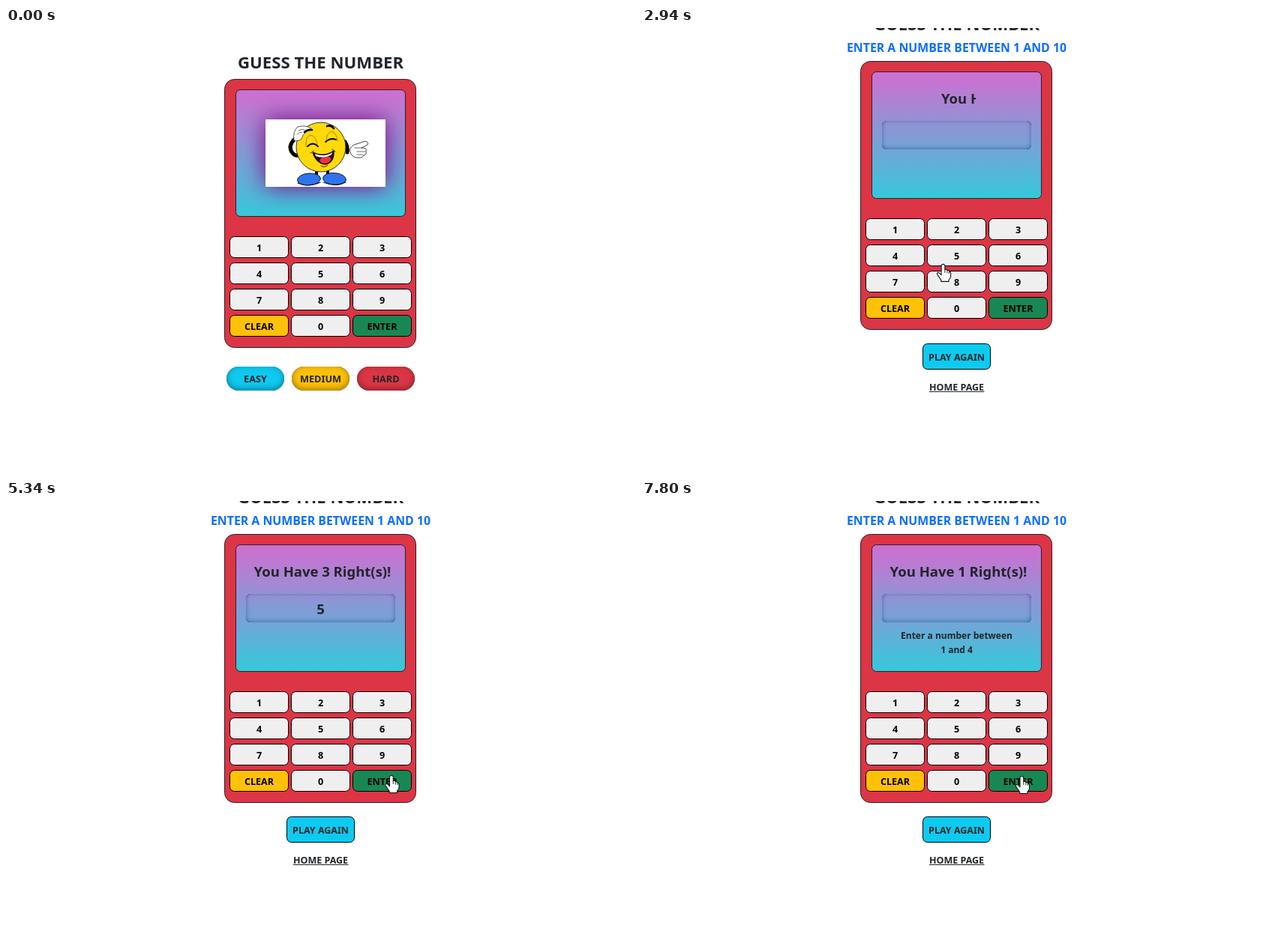
Write an HTML page with a canvas that moves like this. It is 840 px wide and 594 px high and loops after 8000 ms.

```html
<!DOCTYPE html>
<html lang="en">
<head>
<meta charset="utf-8">
<title>Guess the number</title>
<style>
html, body { margin: 0; width: 100%; height: 100%; overflow: hidden; background: #fff; }
canvas { display: block; }
</style>
</head>
<body>
<canvas id="stage" width="840" height="594"></canvas>
<script>
const c = document.getElementById('stage').getContext('2d');
const LOOP = 8000, PAGE = 2460, TYPE = 2478;
const MID = 419.5, INK = '#212529', RED = '#dc3545', CYAN = '#0dcaf0', AMBER = '#ffc107';
const KEYS = ['1', '2', '3', '4', '5', '6', '7', '8', '9', 'CLEAR', '0', 'ENTER'];
const LEVELS = [['EASY', 294, CYAN], ['MEDIUM', 381, AMBER], ['HARD', 468, RED]];

// pointer path: time, x, y
const PATH = [
  [140, 692, 580], [330, 540, 520], [560, 303, 471], [700, 330, 466], [880, 435, 439],
  [950, 430, 434], [1020, 424, 429], [1480, 424, 429], [1620, 433, 432], [1950, 328, 463],
  [2250, 330, 464], [2480, 331, 463], [2700, 371, 378], [2940, 401.5, 315], [3080, 414, 303],
  [3200, 415.5, 304], [4570, 415.5, 304], [4640, 411, 303], [4780, 460, 328], [4990, 546, 364],
  [5130, 546, 364], [5340, 514, 366], [5480, 514, 366], [5610, 514, 366], [5750, 508, 364],
  [6090, 508, 364], [6150, 506, 362], [6480, 506, 362], [6550, 485.5, 358], [6850, 347, 298],
  [7180, 345, 297], [7320, 432, 340], [7460, 506.5, 367], [LOOP, 506.5, 367]
];

function pointerAt(t) {
  const i = PATH.findIndex(p => p[0] > t);
  if (i < 1) return null;
  const [t0, x0, y0] = PATH[i - 1], [t1, x1, y1] = PATH[i];
  const k = (t - t0) / (t1 - t0);
  return [x0 + (x1 - x0) * k, y0 + (y1 - y0) * k];
}

function text(s, x, y, size, color = INK, align = 'center') {
  c.font = `700 ${size}px "Noto Sans", "Open Sans", sans-serif`;
  c.textAlign = align;
  c.fillStyle = color;
  c.fillText(s, x, y);
}

function rounded(x, y, w, h, r) {
  c.beginPath();
  c.roundRect(x, y, w, h, r);
}

function box(x, y, w, h, r, fill, line = '#000') {
  rounded(x + .5, y + .5, w - 1, h - 1, r);
  c.fillStyle = fill;
  c.fill();
  c.lineWidth = 1;
  c.strokeStyle = line;
  c.stroke();
}

function insetShadow(x, y, w, h, r, color, blur, dy) {
  c.save();
  rounded(x, y, w, h, r);
  c.clip();
  c.shadowColor = color;
  c.shadowBlur = blur;
  c.shadowOffsetY = dy;
  c.beginPath();
  c.rect(x - 40, y - 40, w + 80, h + 80);
  c.roundRect(x, y, w, h, r);
  c.fillStyle = '#000';
  c.fill('evenodd');
  c.restore();
}

function shape(d, fill, line, width = 1) {
  const p = new Path2D(d);
  if (fill) { c.fillStyle = fill; c.fill(p); }
  if (line) { c.strokeStyle = line; c.lineWidth = width; c.stroke(p); }
}

function oval(x, y, rx, ry, fill, line, tilt = 0) {
  c.beginPath();
  c.ellipse(x, y, rx, ry, tilt, 0, Math.PI * 2);
  c.fillStyle = fill;
  c.fill();
  if (line) { c.strokeStyle = line; c.lineWidth = 1; c.stroke(); }
}

function smiley() {
  c.lineCap = c.lineJoin = 'round';
  shape('M385 148Q375 158 382 167Q385 171 391 170', null, '#000', 5);
  shape('M414 189V197M429 189V197', null, '#000', 4);
  oval(404, 202, 15.5, 8, '#2f74ee', '#0b1b3c', -.08);
  oval(438, 201.5, 15.5, 8, '#2f74ee', '#0b1b3c', .08);
  shape('M389 207Q404 213 419 206M423 206Q438 212 453 206', null, '#0b1b3c', 1.2);
  shape('M452 152Q456 158 455 166', null, '#000', 5);
  oval(420, 159, 33, 33, '#ffd90a', '#333');
  shape('M384 150Q382 138 389 132Q399 129 407 134Q406 138 401 138Q395 142 394 148Q389 152 384 150Z', '#fff', '#444', .9);
  shape('M390 137Q394 134 398 136M388 142Q391 138 395 139', null, '#444', .8);
  shape('M458 163Q461 156 467 155L479 151Q484 152 482 156L474 160Q482 160 480 164Q481 169 477 170Q475 174 469 173Q461 174 458 163Z', '#fff', '#333', .9);
  shape('M465 160L474 160M468 165H479M468 169H476', null, '#444', .8);
  shape('M400 158Q399 144 406 143Q413 144 415 155M427 153Q427 139 434 138Q441 140 442 151', null, '#8a7400', .8);
  shape('M402 158Q409 151 416 158M426 152Q433 146 440 149', null, '#000', 1.8);
  shape('M398 139Q402 135 408 136M428 131Q433 129 437 134', null, '#000', 2.6);
  shape('M409 166Q424 173 437 164Q438 179 426 182Q414 181 409 166Z', '#35080a', '#000', 1.2);
  oval(426, 176, 7.5, 4.6, '#ef3340', null, -.2);
  shape('M412 168Q425 173 435 166L434 169Q424 175 413 171Z', '#fff');
  shape('M406 167Q408 166 410 164M435 162L439 165M420 184Q424 187 429 183', null, '#222', 1);
  c.lineCap = 'butt';
  c.lineJoin = 'miter';
}

function device(y) {
  box(291, y, 256, 359, 13, RED, INK);
  const g = c.createLinearGradient(0, y + 14, 0, y + 184);
  g.addColorStop(0, '#d26dd0');
  g.addColorStop(1, '#34c9db');
  box(306, y + 14, 227, 170, 6, g, INK);
  KEYS.forEach((k, i) => {
    const x = 298 + i % 3 * 82, top = y + 210 + Math.floor(i / 3) * 35;
    box(x, top, 79, 29, 6, k === 'CLEAR' ? AMBER : k === 'ENTER' ? '#198754' : '#efefef');
    text(k, x + 39.5, top + 20, 12.6, '#000');
  });
}

function startPage() {
  text('GUESS THE NUMBER', MID, 54, 22.2);
  device(68);
  c.save();
  rounded(307, 83, 225, 168, 5);
  c.clip();
  c.shadowColor = 'rgb(128,0,128)';
  c.shadowBlur = 32;
  c.fillStyle = '#fff';
  c.fillRect(346, 122, 160, 90);
  c.restore();
  smiley();
  for (const [name, x, color] of LEVELS) {
    rounded(x, 452, 77, 32, 16);
    c.fillStyle = color;
    c.fill();
    insetShadow(x, 452, 77, 32, 16, 'rgba(0,0,0,.38)', 8, -2);
    text(name, x + 38.5, 473, 12.7);
  }
}

function typed(s, t) {
  const w = Math.max(0, (t - TYPE) * .0995), size = 18.5;
  c.font = `700 ${size}px "Noto Sans", "Open Sans", sans-serif`;
  const full = c.measureText(s).width, left = 422 - Math.min(w, full) / 2;
  c.save();
  c.beginPath();
  c.rect(left, 70, w, 50);
  c.clip();
  text(s, left, 101, size, INK, 'left');
  c.restore();
}

function gamePage(t) {
  const tries = t < 5450 ? 3 : t < 7690 ? 2 : 1;
  text('GUESS THE NUMBER', MID, 3, 22.2);
  text('ENTER A NUMBER BETWEEN 1 AND 10', MID, 32, 15.85, '#0d6efd');
  device(44);
  typed(`You Have ${tries} Right(s)!`, t);
  insetShadow(320, 124, 199, 38, 6, 'rgba(40,70,140,.6)', 6, -1);
  const entry = t >= 4640 && tries === 3 ? '5' : t >= 7120 && tries === 2 ? '4' : '';
  text(entry, MID, 151, 18.5);
  if (tries < 3) {
    text('Enter a number between', MID, 184, 12);
    text(`1 and ${tries + 3 - (tries === 1 ? 0 : 0)}`, MID, 203, 12);
  }
  box(374, 421, 91, 35, 6, CYAN);
  text('PLAY AGAIN', MID, 444, 12.5);
  text('HOME PAGE', MID, 484, 12.5);
  c.fillRect(383, 485, 73.5, 1);
}

function overButton(x, y, game) {
  if (!game) return y > 452 && y < 484 && LEVELS.some(l => x > l[1] && x < l[1] + 77);
  const kx = (x - 298) % 82, ky = (y - 254) % 35;
  const onKey = x > 298 && x < 541 && y > 254 && y < 388 && kx < 79 && ky < 29;
  return onKey || (x > 374 && x < 465 && y > 421 && y < 456);
}

function pointer(x, y, game) {
  c.save();
  c.translate(x, y);
  c.lineJoin = 'round';
  if (overButton(x, y, game)) {
    shape('M-2.5 2.5Q-2.5 .5 0 .5Q2.3 .5 2.3 2.5V7.5Q4.5 6.5 5.4 8.6Q7.5 8 8 10Q10 9.7 10 12V17Q10 19 7.5 21V23.5H-2.8V21.5L-7.5 14.5Q-9 12 -7 11.5Q-5.5 11.3 -2.5 14.8Z', '#fff', '#111', 1.1);
    shape('M2.3 7.5V12M5.4 8.6V12.5M8 10V13', null, '#111', .9);
  } else {
    shape('M.5 .5V16.5L4.2 13L6.7 18.7L9.1 17.7L6.7 12H11.6Z', '#fff', '#000', 1);
  }
  c.restore();
}

function draw(t) {
  const game = t >= PAGE;
  c.fillStyle = '#fff';
  c.fillRect(0, 0, 840, 594);
  if (game) gamePage(t); else startPage();
  const p = pointerAt(t);
  if (p) pointer(p[0], p[1], game);
}

const begin = performance.now();
function frame() {
  draw((performance.now() - begin) % LOOP);
  requestAnimationFrame(frame);
}
frame();
</script>
</body>
</html>
```
